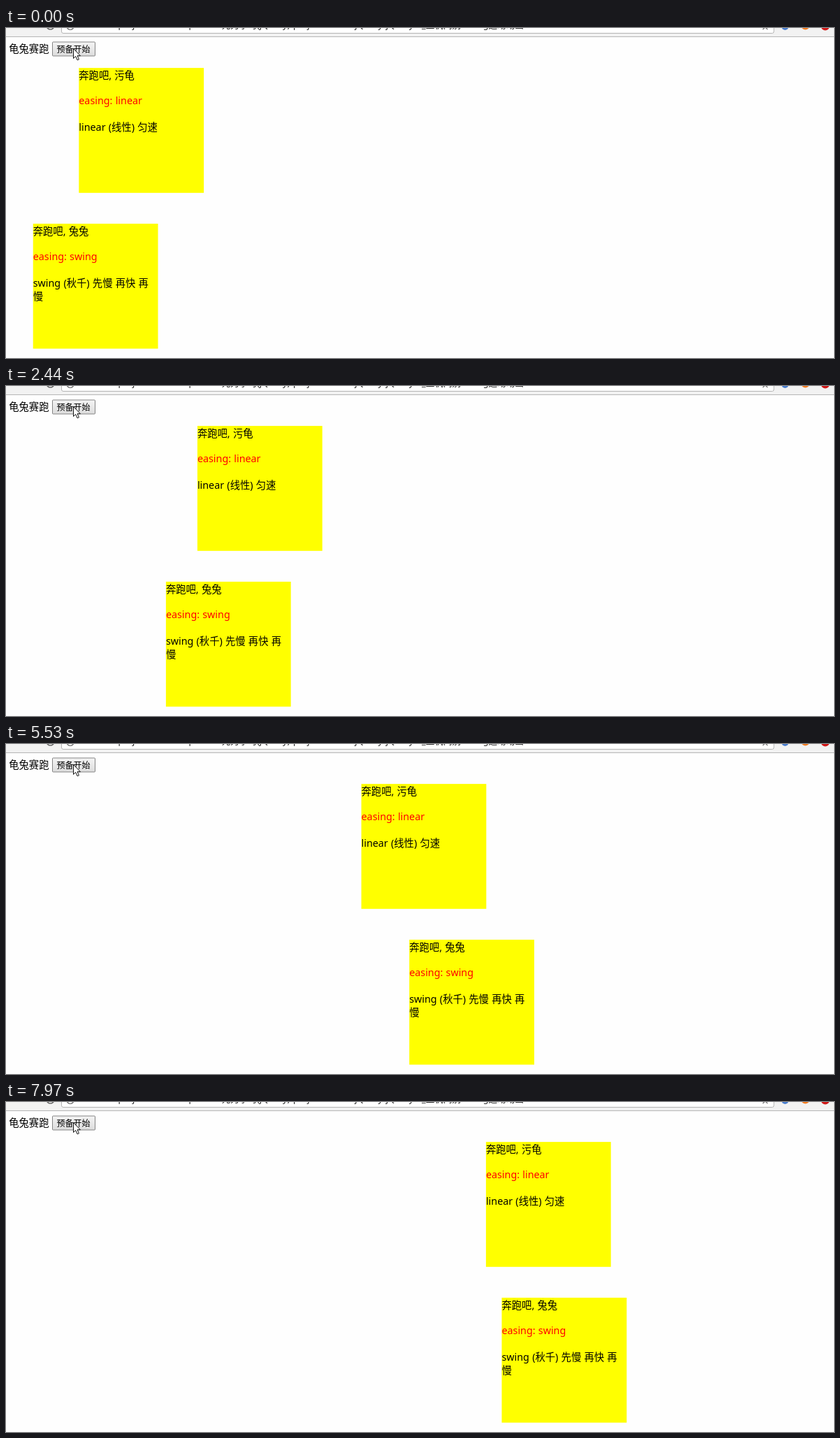
Animation, 1185 px wide and 472 px high, one loop 8000 ms. Source, as an HTML page:

```html
<!DOCTYPE html>
<html lang="zh-CN">
<head>
<meta charset="utf-8">
<title>龟兔赛跑</title>
<style>
  html, body { margin: 0; width: 100%; height: 100%; overflow: hidden; background: #fefefe; }
  svg { display: block; }
  text { font: 14.32px "Noto Sans", "Noto Sans CJK SC", "Noto Sans CJK", sans-serif; word-spacing: 0.5px; white-space: pre; }
  .box { fill: #ff0; }
  .easing { fill: #f00; }
  .small { font-size: 12px; }
  .address { font-size: 12.6px; fill: #222; }
</style>
</head>
<body>
<svg width="1185" height="472" viewBox="0 0 1185 472">
  <defs>
    <linearGradient id="face" x2="0" y2="1">
      <stop stop-color="#f4f4f4"/>
      <stop offset="1" stop-color="#dcdcdc"/>
    </linearGradient>
  </defs>

  <!-- browser bar -->
  <rect width="1185" height="12" fill="#f2f2f2"/>
  <rect y="12" width="1185" height="1" fill="#b6b6b6"/>
  <rect x="79.5" y="-20" width="1019.5" height="27.5" rx="2.5" fill="#fff" stroke="#b4b4b4"/>
  <g fill="none" stroke="#666" stroke-width="1.6">
    <circle cx="63.5" cy="-3.5" r="5.5"/>
    <circle cx="92" cy="-2.5" r="5" stroke-width="1.2"/>
    <path d="M1083 2l3.5-3 3.5 3" stroke-width="1.1"/>
  </g>
  <text class="address" x="108" y="0.3">file:///D:/project/web/component/元力学习(jQuery)/project/lesson/jQuery/jQuery/5_上机问别/swing运动动画.html</text>
  <circle cx="1115" cy="-2" r="5" fill="#4a7fd0"/>
  <circle cx="1144" cy="-3.5" r="6" fill="#f57c1f"/>
  <circle cx="1172.5" cy="-2.5" r="6" fill="#d01818"/>

  <text x="4.2" y="35">龟兔赛跑</text>
  <rect x="66.5" y="20" width="61" height="20" rx="1" fill="url(#face)" stroke="#858585"/>
  <text class="small" x="72.5" y="34.6">预备开始</text>

  <g id="turtle">
    <rect class="box" y="57.1" width="178.8" height="178.7"/>
    <text y="72.5">奔跑吧, 污龟</text>
    <text class="easing" y="109">easing: linear</text>
    <text y="146.5">linear (线性) 匀速</text>
  </g>
  <g id="rabbit">
    <rect class="box" y="279.9" width="178.8" height="178.7"/>
    <text y="295.5">奔跑吧, 兔兔</text>
    <text class="easing" y="332">easing: swing</text>
    <text y="369.5">swing (秋千) 先慢 再快 再</text>
    <text y="389">慢</text>
  </g>

  <path d="M96.5 29.5v14l3.2-3 2.4 5.4 2.3-1-2.3-5.2h4.3z" fill="#fff" stroke="#111" stroke-width="1"/>
</svg>
<script>
  const LOOP = 8000, START = 4.6, DISTANCE = 707, SPEED = 0.0731, LEAD = 99.7;
  const turtle = document.getElementById('turtle');
  const rabbit = document.getElementById('rabbit');

  // Repaint bursts: first time, last time, number of repaints
  const bursts = [
    [120, 1120, 8], [1240, 2200, 8], [2320, 3250, 8], [3380, 4310, 8],
    [4460, 5380, 8], [5530, 6460, 8], [6580, 7550, 8], [7700, 7970, 3]
  ];
  const ticks = [0];
  for (const [from, to, count] of bursts) {
    for (let i = 0; i < count; i++) {
      ticks.push(Math.floor((from + (to - from) * i / (count - 1)) / 10) * 10);
    }
  }

  const swing = p => 0.5 - Math.cos(p * Math.PI) / 2;
  const place = (el, p) =>
    el.setAttribute('transform', `translate(${(START + DISTANCE * p).toFixed(2)} 0)`);

  function draw(time) {
    const tick = ticks.findLast(t => t <= time);
    const p = (LEAD + SPEED * tick) / DISTANCE;
    place(turtle, p);
    place(rabbit, swing(p));
  }

  const origin = performance.now();
  function loop() {
    draw((performance.now() - origin) % LOOP);
    requestAnimationFrame(loop);
  }
  loop();
</script>
</body>
</html>
```
